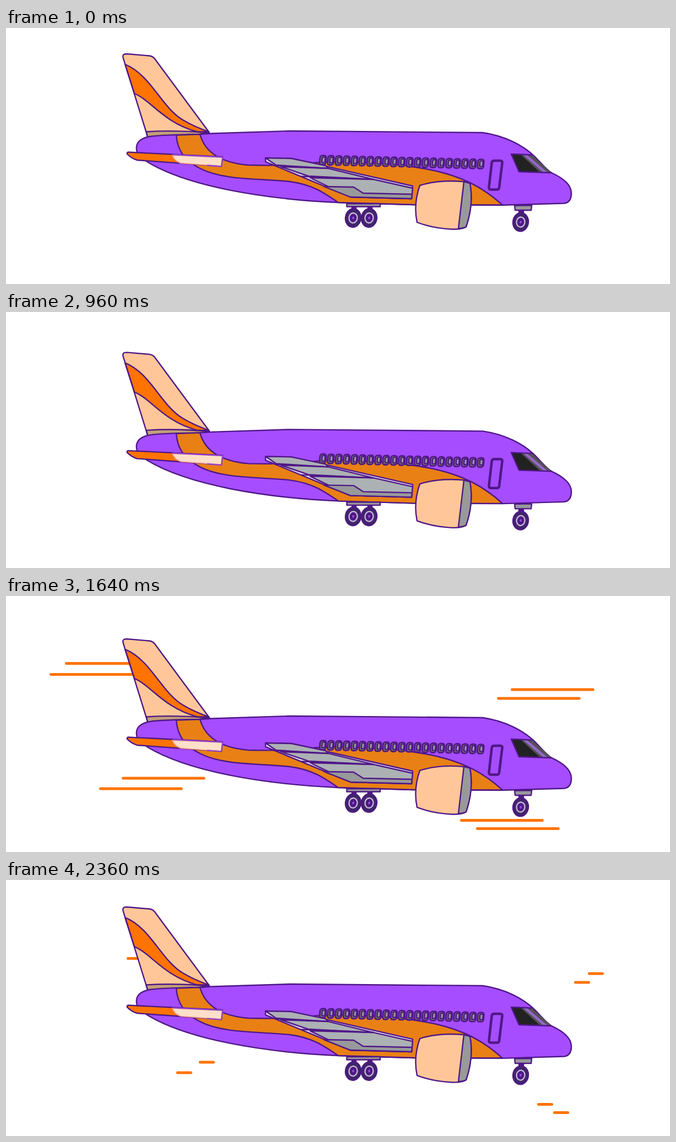
An HTML page that plays this animation: 1205x465 px, repeating every 2.4 s.

```html
<!DOCTYPE html>
<html lang="en">
<head>
<meta charset="utf-8">
<title>Airplane</title>
<style>
  html, body { margin: 0; width: 100%; height: 100%; overflow: hidden; background: #fff; }
  svg { display: block; width: 100vw; height: 100vh; }
  .ink { stroke: #4f1787; stroke-width: 2.4; stroke-linejoin: round; stroke-linecap: round; }
  .line { fill: none; }
</style>
</head>
<body>
<svg viewBox="0 0 1205 465" xmlns="http://www.w3.org/2000/svg">
  <g id="streaks" stroke="#ff7300" stroke-width="5" stroke-linecap="round"></g>
  <g id="plane">
    <!-- tail fin -->
    <path fill="#ffc799" d="M212.500 54Q210.500 47 219 47L260 50.500Q266 51 270 56L369 190L257.500 199Z"/>
    <path class="ink" fill="#ff7300" d="M216 66C262 84 282 144 321 167Q341 179 368 188.500L347 188.500C286 172 264 132 233 119Z"/>
    <path class="ink" fill="#c39f77" d="M254.500 188.500Q305 185 369 190.500L330 196L257.500 200Z"/>
    <path class="ink line" d="M257.500 199L212.500 54Q210.500 47 219 47L260 50.500Q266 51 270 56L369 190"/>

    <!-- fuselage -->
    <path class="ink" fill="#a54dff" d="M238 226C233 209 243 200 262 197C285 193.500 320 194 352 193L375 191.500L515 187L865 190C907 196 939 214 959 233C971 245 980 257 990 263C1014 274 1026 287 1026 300Q1026 317 1013 318.500L900 321.800L740 321L603 317C468 311 330 288 256 243Z"/>
    <path class="ink" fill="#e98015" d="M309 194.500C311 222 324 241 352 255C394 277 460 273 515 279C555 284 577 299 603 317L740 321L901 321.500C875 298 835 267 750 254C690 244 600 240 558 245C520 250 480 250 440 249C391 245 361 226 352 193Z"/>

    <!-- tailplane -->
    <path class="ink" fill="#ff7300" d="M222 225.500L393 234L391 251L238 240Q228 237 220 229Q219 226 222 225.500Z"/>
    <path fill="#ffdfc9" stroke="#ff9c8c" stroke-width="1.500" d="M302 231L393 235L391 251L317 245.500Q305 241 302 231Z"/>
    <path fill="none" stroke="#9140d0" stroke-width="2.300" stroke-linejoin="round" d="M303 230L393 234.500L391 251.500L365 249.500"/>

    <!-- cabin windows and door -->
    <g id="windows"></g>
    <path fill="none" stroke="#4f1787" stroke-width="4.500" stroke-linejoin="round" d="M886 241H897Q901 241 900.500 245L895 290Q894.500 293.500 891 293.500H880Q876 293.500 876.500 289L881.500 245Q882 241 886 241Z"/>

    <!-- wing -->
    <g class="ink">
      <path fill="#ded3ec" d="M471 236L518 237L738 287L736 310L625 307L471 243Z"/>
      <path fill="#acb1b4" d="M471 236L518 237L580 250L585 255L490 249Z"/>
      <path fill="#acb1b4" d="M499 252L585 255L667 275L549 269Z"/>
      <path fill="#acb1b4" d="M552 272L667 275L738 291L736 310L625 307L587 289Z"/>
      <path fill="#98999b" d="M577 288L631 289L648 300L737 302L736 310L625 307Z"/>
      <path class="line" d="M488 250L585 255M537 269.500L667 275"/>
    </g>

    <!-- engine -->
    <path class="ink" fill="#ffc799" d="M751 286Q785 275 831 279L842 282Q849 320 835 361Q828 366 810 365.500Q775 364 746 353Q739 320 751 286Z"/>
    <path class="ink" fill="#98999b" d="M831 279L842 282Q849 320 835 361Q830 364 821 364Z"/>

    <!-- windshield -->
    <path fill="#222" d="M917 229L954 230.500L990 263L931 261Z"/>
    <path fill="#555059" d="M934 230L954 230.500L990 263L969 262Z"/>
    <path fill="#9568c9" d="M939 231L946 231L983 262.500L975 262Z"/>
    <path class="ink line" d="M955 230.500L917 229L931 261L990 263"/>

    <!-- landing gear -->
    <g class="ink" fill="#98999b">
      <path d="M618.500 319H679V324.500H618.500Z"/>
      <path d="M923 322.500L954 322L953 331H924Z"/>
      <path fill="#4f1787" d="M628 326H635V332H628ZM657 326H664V332H657ZM931 332H939V338H931Z"/>
    </g>
    <g id="wheels"></g>
  </g>
</svg>
<script>
const LOOP = 2400;
const DROP = 38;
const STREAK = { cycle: 1137, half: 441, lead: 55, length: 164 };
const SVG_NS = 'http://www.w3.org/2000/svg';
const plane = document.getElementById('plane');

function add(parentId, tag, attrs) {
  const node = document.createElementNS(SVG_NS, tag);
  for (const name in attrs) node.setAttribute(name, attrs[name]);
  document.getElementById(parentId).appendChild(node);
  return node;
}

// cubic-bezier(.42, 0, 1, 1)
function easeIn(x) {
  if (x <= 0) return 0;
  if (x >= 1) return 1;
  let low = 0, high = 1;
  for (let i = 0; i < 24; i++) {
    const s = (low + high) / 2;
    if (1.26 * s + 0.48 * s * s - 0.74 * s ** 3 < x) low = s; else high = s;
  }
  return 3 * low * low - 2 * low ** 3;
}

for (let i = 0; i < 21; i++) {
  const place = `translate(${575 + i * 14.32} ${240 + i * 0.35}) skewX(-5)`;
  add('windows', 'rect', { x: -5.5, y: -8.5, width: 11, height: 17, rx: 4, transform: place,
    fill: '#6b6570', stroke: '#4f1787', 'stroke-width': 2.6 });
  add('windows', 'rect', { x: -1.5, y: -5.5, width: 5.5, height: 10, rx: 2, transform: place,
    fill: '#98999b', stroke: '#4f1787', 'stroke-width': 2.2 });
}

for (const [cx, cy] of [[630, 345], [659, 345], [934, 352.5]]) {
  const oval = (rx, ry, fill, stroke, width) =>
    add('wheels', 'ellipse', { cx, cy, rx, ry, fill, stroke, 'stroke-width': width,
      transform: `rotate(8 ${cx} ${cy})` });
  oval(14, 16.8, '#40266a', '#4f1787', 2.3);
  oval(7.5, 9, '#4f1787', '#c9bcd9', 2.3);
  oval(2.5, 3, '#8a4fc9', '#4f1787', 1);
}

// Left end and height of each full streak
const streaks = [
  [109.5, 122.5], [81.5, 142.5], [918.5, 170], [893.5, 186],
  [212.5, 331], [171.5, 350], [826.5, 407.5], [855.5, 422.5]
].map(([left, y]) => ({ left, node: add('streaks', 'line', { y1: y, y2: y }) }));

function draw(time) {
  const t = time % LOOP;
  const half = LOOP / 2;
  const fall = easeIn((t % half) / half);
  plane.setAttribute('transform', `translate(0 ${DROP * (t < half ? fall : 1 - fall)})`);

  const phase = (t + STREAK.lead) % STREAK.cycle;
  const head = STREAK.length * easeIn(phase / STREAK.half);
  const tail = STREAK.length * easeIn(phase / STREAK.half - 1);
  const visible = head > 6 && tail < STREAK.length;
  for (const { left, node } of streaks) {
    node.setAttribute('x1', left + STREAK.length - head);
    node.setAttribute('x2', left + STREAK.length - tail);
    node.setAttribute('visibility', visible ? 'visible' : 'hidden');
  }
}

const start = performance.now();
function tick(now) {
  draw(Math.max(0, now - start));
  requestAnimationFrame(tick);
}
draw(0);
requestAnimationFrame(tick);
</script>
</body>
</html>
```
